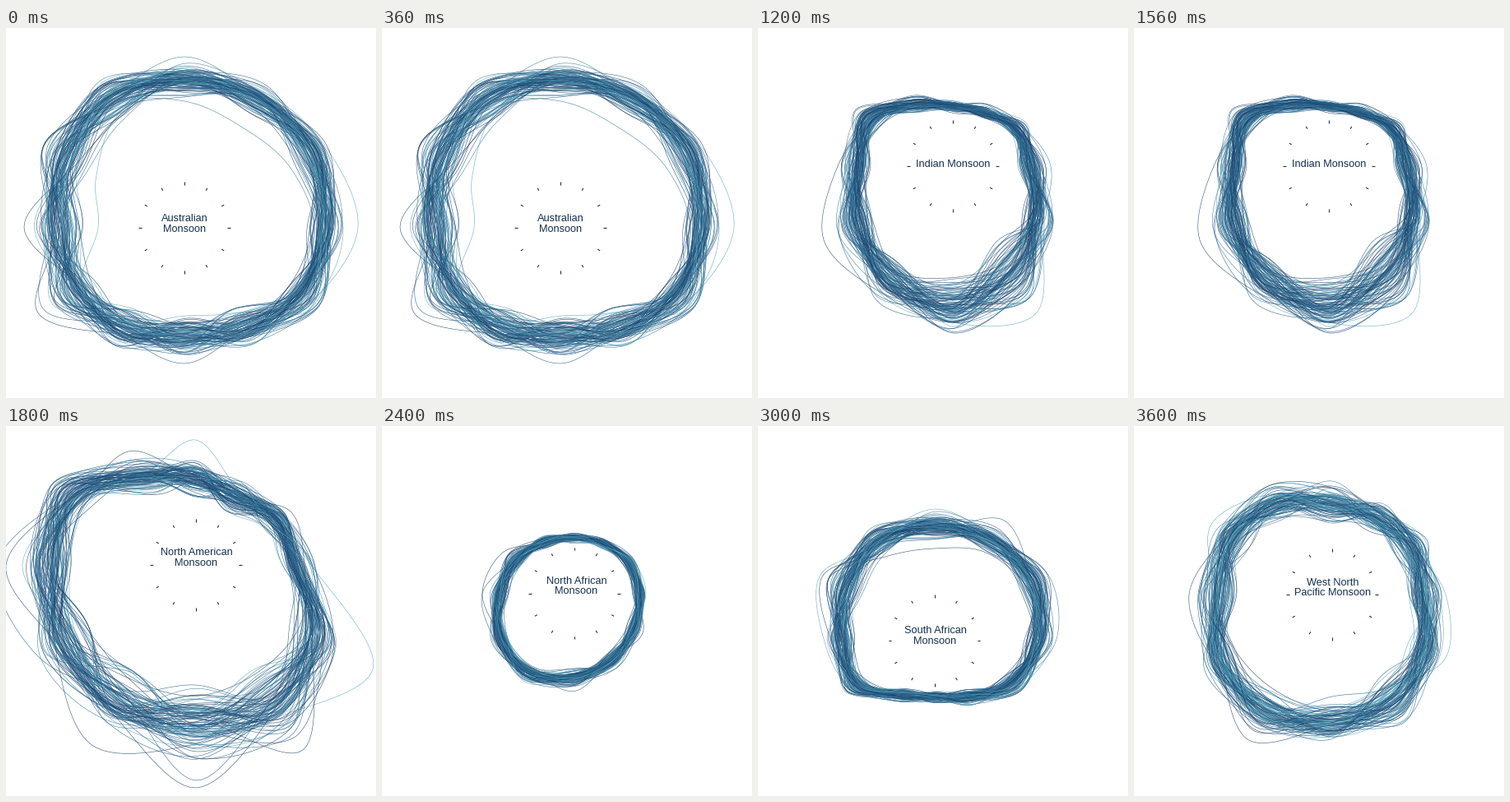
These frames come from a looping animation (450x450 px, 4200 ms). A matplotlib script:

```python
import numpy as np
import matplotlib.pyplot as plt
from matplotlib.animation import FuncAnimation
from matplotlib.collections import LineCollection

SIZE, DPI = 450, 100
PX = 72 / DPI  # points per pixel
YEARS, STEPS = 104, 14
INK = "#17304f"
BLUES = ["#1d3f69", "#235a85", "#35789c", "#55a5ba"]
SHARES = [0.3, 0.27, 0.23, 0.2]

MONTHS = np.arange(12) * np.pi / 6
SPOKES = np.column_stack([np.sin(MONTHS), -np.cos(MONTHS)])


def closed_spline(points):
    """Catmull-Rom curve through a closed ring of points."""
    t = np.linspace(0, 1, STEPS, endpoint=False)[:, None]
    before, after, later = (np.roll(points, s, axis=0) for s in (1, -1, -2))
    parts = [
        0.5 * (2 * b + (c - a) * t + (2 * a - 5 * b + 4 * c - d) * t**2
               + (3 * b - a - 3 * c + d) * t**3)
        for a, b, c, d in zip(before, points, after, later)
    ]
    return np.vstack(parts + [points[:1]])


def scene(name, center, label, low, mid, high, strays):
    """One monsoon: a ring of yearly curves with monthly radii.

    low, mid and high bound the radius for each month, clockwise from the top;
    strays give single years with unusual months.
    """
    low, mid, high = map(np.array, (low, mid, high))
    rng = np.random.default_rng(len(name) + int(center[0]))
    z = rng.normal(size=(YEARS, 12)).clip(-2.4, 2.4)
    radii = mid + z * np.where(z > 0, high - mid, mid - low) / 2.3
    for i, stray in enumerate(strays):
        for month, radius in stray.items():
            radii[7 + 9 * i, month] = radius
    curves = [closed_spline(center + r[:, None] * SPOKES) for r in radii]
    colors = rng.choice(BLUES, YEARS, p=SHARES)
    return name, np.array(center), label, curves, colors


SCENES = [
    scene("Australian\nMonsoon", (217, 243), (217, 235),
          [160, 158, 156, 150, 146, 116, 108, 114, 128, 122, 138, 152],
          [180, 180, 181, 170, 165, 142, 131, 141, 152, 152, 167, 181],
          [199, 199, 201, 192, 190, 163, 153, 167, 184, 182, 197, 205],
          [{6: 165}, {3: 211, 2: 198}, {8: 206}, {9: 195}, {0: 208},
           {9: 105, 10: 124, 11: 160}, {0: 154, 1: 141, 2: 148}, {8: 198}]),
    scene("East Asian\nMonsoon", (222, 155), (225, 145),
          [63, 72, 89, 84, 88, 120, 128, 120, 102, 88, 89, 78],
          [76, 85, 103, 100, 111, 155, 178, 158, 125, 106, 106, 90],
          [89, 100, 118, 118, 135, 200, 226, 200, 155, 126, 124, 106],
          [{3: 151, 2: 112}, {4: 169, 3: 105}, {8: 183}, {6: 236}, {6: 119},
           {7: 113}, {2: 124, 3: 110}]),
    scene("Indian Monsoon", (237, 168), (237, 169),
          [65, 67, 80, 80, 99, 112, 137, 127, 112, 100, 101, 76],
          [72, 76, 90, 94, 118, 148, 170, 155, 134, 117, 117, 86],
          [79, 86, 103, 112, 140, 184, 200, 186, 160, 136, 136, 97],
          [{5: 205, 6: 190}, {8: 181, 9: 140}, {3: 119}, {11: 99}, {5: 106},
           {6: 203}]),
    scene("North American\nMonsoon", (231, 169), (231.5, 157),
          [84, 76, 94, 106, 134, 145, 152, 152, 152, 148, 146, 100],
          [105, 96, 112, 122, 167, 195, 192, 192, 185, 177, 171, 125],
          [126, 116, 131, 144, 200, 242, 240, 236, 218, 212, 200, 147],
          [{0: 152}, {4: 249, 3: 140}, {6: 271}, {9: 243, 8: 222}, {11: 160},
           {5: 260}, {6: 146}, {9: 231}, {7: 253}, {6: 262}]),
    scene("North African\nMonsoon", (234, 203.5), (236.5, 191.5),
          [61, 64, 69, 71, 74, 83, 92, 101, 93, 80, 73, 65],
          [67, 69, 76, 79, 83, 92, 102, 112, 104, 91, 82, 72],
          [73, 75, 84, 87, 92, 104, 114, 123, 116, 102, 93, 80],
          [{9: 112, 10: 100}, {9: 112, 8: 112}, {6: 119}, {4: 96}]),
    scene("South African\nMonsoon", (214.5, 261), (215.5, 252.5),
          [124, 124, 122, 110, 94, 70, 62, 67, 96, 96, 105, 122],
          [139, 140, 139, 126, 108, 79, 68, 76, 109, 112, 124, 139],
          [156, 156, 160, 143, 122, 90, 75, 86, 124, 130, 148, 156],
          [{1: 169}, {10: 160, 9: 134}, {0: 112, 1: 124, 11: 118},
           {10: 157}, {3: 148, 2: 160}, {0: 160}]),
    scene("West North\nPacific Monsoon", (241, 205), (241.5, 193.5),
          [90, 90, 92, 94, 109, 117, 130, 135, 137, 116, 117, 105],
          [110, 108, 111, 111, 129, 147, 154, 164, 160, 138, 141, 129],
          [131, 126, 132, 132, 150, 177, 176, 190, 179, 162, 164, 152],
          [{0: 138}, {7: 204}, {10: 170}, {9: 174}, {6: 124}, {0: 87},
           {3: 138, 4: 158}]),
]

fig = plt.figure(figsize=(SIZE / DPI, SIZE / DPI), dpi=DPI, facecolor="white")
ax = fig.add_axes([0, 0, 1, 1])


def draw(frame):
    name, center, (x, y), curves, colors = SCENES[frame]
    ax.clear()
    ax.axis("off")
    ax.set(xlim=(0, SIZE), ylim=(SIZE, 0))
    ax.add_collection(LineCollection(curves, colors=colors,
                                     linewidths=0.55 * PX, alpha=0.9))
    ticks = [[center + 52.3 * s, center + 55.6 * s] for s in SPOKES]
    ax.add_collection(LineCollection(ticks, colors=INK, linewidths=1.1 * PX))
    for i, line in enumerate(name.split("\n")):
        ax.text(x, y + 12.6 * i, line, ha="center", va="baseline", color=INK,
                family="Liberation Sans", size=12.7 * PX)
    return ax.get_children()


anim = FuncAnimation(fig, draw, frames=len(SCENES), interval=600,
                     repeat=True, repeat_delay=0)
plt.show()
```
